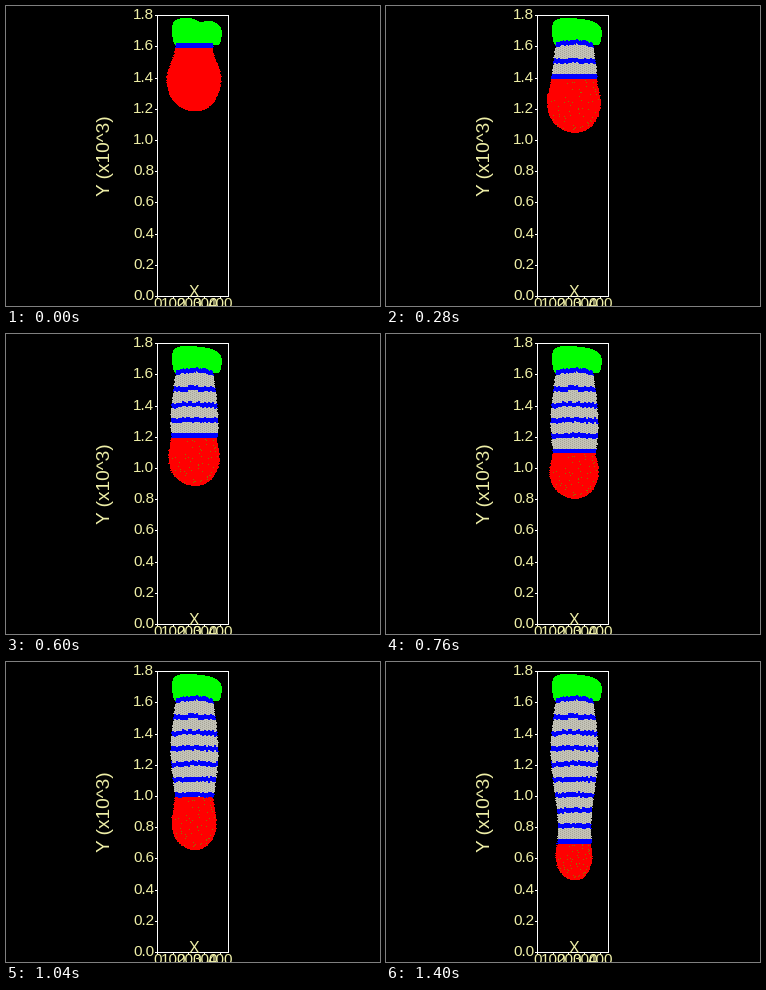
These frames come from a looping animation (374 px wide and 300 px high, 1440 ms). A matplotlib script:

```python
import numpy as np
import matplotlib.pyplot as plt
from matplotlib.animation import FuncAnimation

W, H = 374, 300
FRAMES, INTERVAL = 36, 40
RED, GREEN, BLUE = (255, 0, 0), (0, 255, 0), (0, 0, 255)
GREY, DARK_GREY = (196, 195, 184), (166, 165, 150)
OLIVE, WHITE = (150, 112, 0), (255, 255, 255)
CREAM = "#f0f0a8"

LEFT, RIGHT, TOP, BOTTOM = 151, 222, 9, 290
X_STEP, Y_STEP = 15.7, 31.2
BAND_Y, BAND_STEP = 38.8, 15.55
SOLID_X, MELT_X, CAP_X, CAP_Y = 188, 187.5, 190.5, 25

rng = np.random.default_rng(4)
edge_noise = rng.uniform(-0.6, 0.6, (2, H, 1))
band_noise = np.repeat(rng.uniform(-1, 1, (10, W // 2)), 2, axis=1)
specks = rng.uniform(-0.95, 0.95, (60, 2))

yy, xx = np.mgrid[0:H, 0:W]
dots = (xx % 2 == 0) & (yy % 2 == (xx // 2) % 2)


def solid_half(y):
    """Half width of the solid part: widest near 88, narrowest near 168."""
    return 20.2 + 3.5 * np.cos(np.pi * (y - 88) / 80)


def melt_half(frame, height, depth):
    """Half width of the melt at a height above its tip; depth is its full height."""
    p = frame / (FRAMES - 1)
    radius = 27.3 - 9 * p ** 2
    belly = 33 - 9 * p
    low = np.clip(1 - height / belly, 0, 1)
    rounded = radius * np.sqrt(1 - low ** 2.2)
    u = np.clip((height - belly) / (depth - belly), 0, 1)
    neck = solid_half(BAND_Y + BAND_STEP * bands(frame) - BAND_STEP) - radius
    return rounded + neck * u * u * (3 - 2 * u)


def bands(frame):
    """A new layer starts every four frames."""
    return (frame + 1) // 4 + 1


def band_line(k, age):
    """Row of band k at every column; it buckles as it ages."""
    settle = min(age / 6, 1)
    arch = 1 - np.clip(abs(np.arange(W) - SOLID_X) / 20, 0, 1)
    rise = 4 * arch if k == 0 else 1.2 * arch - 0.8
    return BAND_Y + BAND_STEP * k + settle * (band_noise[k] - rise)


def cap_mask(settle):
    """Rounded block with a tilted top that starts out dented."""
    tilt = 0.1 * (xx - CAP_X)
    dent = 3 * (1 - settle) * np.exp(-((xx - 194) / 6) ** 2)
    up = np.clip(CAP_Y + tilt + dent - yy, 0, None) / 13
    down = np.clip(yy - CAP_Y, 0, None) / 20
    side = abs(xx - CAP_X) / 24.7
    return (side ** 3 + up ** 3 + down ** 3 <= 1) & (yy <= BAND_Y)


def draw_box(img):
    img[TOP:BOTTOM + 1, [LEFT, RIGHT]] = WHITE
    img[[TOP, BOTTOM], LEFT:RIGHT + 1] = WHITE
    for k in range(10):
        img[round(BOTTOM - k * Y_STEP), LEFT - 2:LEFT] = WHITE
    for k in range(5):
        img[BOTTOM:BOTTOM + 3, round(LEFT + k * X_STEP)] = WHITE


def render(frame):
    img = np.zeros((H, W, 3), np.uint8)
    draw_box(img)
    img[cap_mask(min(frame / 6, 1))] = GREEN

    count = bands(frame)
    top = BAND_Y + BAND_STEP * (count - 1) + 2
    tip = 105 + 3 * frame + 0.0065 * frame ** 2

    rows = np.arange(H)
    solid = rows < top
    half = np.where(solid, solid_half(rows), melt_half(frame, tip - rows, tip - top))
    centre = np.where(solid, SOLID_X, MELT_X + np.clip(1 - (tip - rows) / 12, 0, 1))
    left = (centre - half)[:, None] + edge_noise[0]
    right = (centre + half)[:, None] + edge_noise[1]
    inside = (xx >= left) & (xx <= right)

    body = inside & (yy > band_line(0, frame)) & (yy <= tip)
    grey, red = body & (yy < top), body & (yy >= top)
    img[grey] = GREY
    img[grey & dots] = DARK_GREY
    img[red] = RED

    if frame:
        y = ((top + tip) / 2 + specks[:, 1] * (tip - top) / 2).astype(int)
        x = (centre[y] + specks[:, 0] * half[y]).astype(int)
        hit = red[y, x]
        img[y[hit], x[hit]] = OLIVE

    for k in range(count):
        age = frame + 1 - 4 * k if k else frame
        img[inside & (abs(yy - band_line(k, age)) <= 2.4)] = BLUE
    return img


def label(x, y, text, size, **kw):
    kw = {"ha": "center", "va": "center", **kw}
    fig.text(x / W, 1 - y / H, text, color=CREAM, family="Liberation Sans",
             fontsize=size * 0.72, **kw)


fig = plt.figure(figsize=(W / 100, H / 100), dpi=100, facecolor="black")
picture = fig.figimage(render(0), origin="upper")

for k in range(10):
    label(148, BOTTOM - 1.5 - k * Y_STEP, f"{k * 0.2:.1f}", 15.2, ha="right",
          va="center_baseline")
for k in range(5):
    label(LEFT + 1 + k * X_STEP, 298.5, str(k * 100), 15.2)
label(187.5, 286.5, "X", 16)
label(99.5, 149.5, "Y (x10^3)", 19, rotation=90)


def update(frame):
    picture.set_data(render(frame))
    return [picture]


anim = FuncAnimation(fig, update, frames=FRAMES, interval=INTERVAL,
                     repeat=True, repeat_delay=0, blit=False)
plt.show()
```
